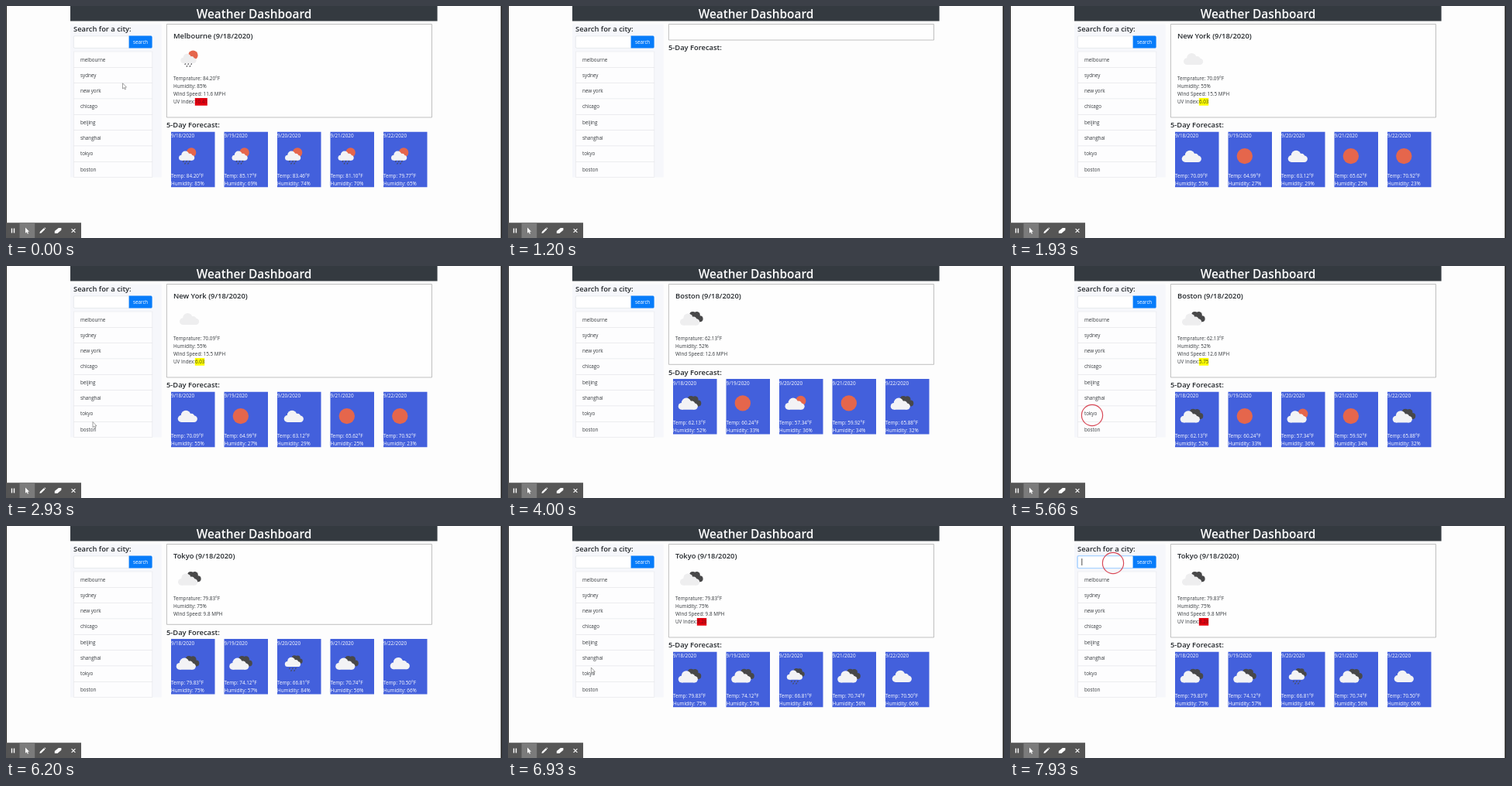
An HTML page that plays this animation: 640 px wide and 300 px high, repeating every 8000 ms.

```html
<!DOCTYPE html>
<html lang="en">
<head>
<meta charset="utf-8">
<title>Weather Dashboard</title>
<style>
html, body { margin: 0; width: 100%; height: 100%; overflow: hidden; background: #fdfdfd; }
svg { display: block; width: 100vw; height: 100vh; }
text { font: 6.35px "Open Sans", "Noto Sans", sans-serif; fill: #35393d; }
.head { font-size: 9.35px; font-weight: 600; fill: #24282c; }
.title { font-size: 15.4px; font-weight: 600; fill: #fff; text-anchor: middle; }
.item { font-size: 6.25px; }
.white { fill: #fff; }
</style>
</head>
<body>
<svg viewBox="0 0 640 300">
  <defs>
    <g id="cloud">
      <circle cx="-8.2" cy="3.1" r="4.4"/><circle cx="-2.2" cy="-1.5" r="6.2"/>
      <circle cx="4.8" cy=".6" r="4.3"/><circle cx="8.4" cy="3.3" r="4.2"/>
      <path d="M-8.2 0H5L8.4 7.5H-8.2z"/>
    </g>
    <g id="lobes">
      <circle cx="1.8" cy="-5.2" r="4.1"/><circle cx="7" cy="-5" r="4.2"/><circle cx="11" cy="0" r="4"/>
      <path d="M1 -5H8L11 4H4z"/>
    </g>
    <path id="drops" d="M-4.6 8.4l-.4 .8M-.6 8.4l-.4 .8M3.4 8.4l-.4 .8M-2.4 11.2l-.4 .8M1.6 11.2l-.4 .8" stroke="#4a4a4f" stroke-width="1.2" stroke-linecap="round"/>
    <path id="pointer" d="M0 0V7.2L1.7 5.7 2.9 8.2 4 7.7 2.9 5.3H5z"/>
  </defs>
  <path d="M0 0H640V300H0z" fill="#fdfdfd"/>
  <path d="M0 0H1V300H0zM638.4 0H640V300H638.4z" fill="#222"/>
  <path d="M83 0H556.6V19.6H83z" fill="#343a40"/>
  <text class="title" x="320" y="16.3">Weather Dashboard</text>
  <path d="M83 23.5H200.8V221.4H83z" fill="#f6f7fb"/>
  <text class="head" x="87" y="33.2">Search for a city:</text>
  <rect id="glow" x="86.2" y="37.7" width="73.4" height="17.6" rx="2.4" fill="#bfdeff"/>
  <rect id="input" x="87.3" y="38.8" width="72" height="15.6" rx="1.6" fill="#fff" stroke-width=".6"/>
  <path id="caret" d="M92.8 42V51" stroke="#222" stroke-width=".8"/>
  <path d="M158.6 38.6H187a1.6 1.6 0 0 1 1.6 1.6V53a1.6 1.6 0 0 1-1.6 1.6H158.6z" fill="#087cfa"/>
  <text class="white item" x="164" y="48.9">search</text>
  <g id="list"></g>
  <g id="main"></g>
  <g id="bar">
    <path d="M0 280.3H97V300H0z" fill="#555"/>
    <path d="M17.5 280.3H37.2V300H17.5z" fill="#7b7b7b"/>
    <path d="M6.8 287.6H8.2V293.4H6.8zM9.8 287.6H11.2V293.4H9.8z" fill="#fff"/>
    <use href="#pointer" x="25" y="286.5" fill="#fff"/>
    <path d="M43.4 294l.6-2.2 4.8-4.6 1.6 1.6-4.8 4.6zM49.4 286.7l.6-.5 1.5 1.5-.6.6z" fill="#fff"/>
    <path d="M62.8 291l5-4H71.4V289.8L66.4 294H62.8z" fill="#fff"/>
    <path d="M84.6 288.1l4.8 4.8M89.4 288.1l-4.8 4.8" stroke="#fff" stroke-width="1.1"/>
  </g>
  <use id="cursor" href="#pointer" fill="#fff" stroke="#666" stroke-width=".6"/>
  <path id="beam" d="M-1.5-4H1.5M0-4V4M-1.5 4H1.5" stroke="#333" stroke-width=".7"/>
  <circle id="ring" r="13.6" fill="none" stroke="#d84a58" stroke-width="1.2"/>
</svg>
<script>
const $ = id => document.getElementById(id);
const LOOP = 8000;

const cities = {
  Melbourne: { wind: '11.6', uv: '10.41', red: true, icon: 'shower',
    temps: ['84.20', '85.17', '83.46', '81.10', '79.77'], hums: [85, 69, 74, 70, 65],
    icons: ['shower', 'shower', 'shower', 'shower', 'shower'] },
  'New York': { wind: '15.5', uv: '6.03', icon: 'cloud',
    temps: ['70.09', '64.99', '63.12', '65.62', '70.92'], hums: [55, 27, 29, 25, 23],
    icons: ['cloud', 'sun', 'cloud', 'sun', 'sun'] },
  Boston: { wind: '12.6', uv: '5.75', icon: 'broken',
    temps: ['62.13', '60.24', '57.34', '59.92', '65.88'], hums: [52, 33, 36, 34, 32],
    icons: ['broken', 'sun', 'few', 'sun', 'broken'] },
  Tokyo: { wind: '9.8', uv: '8.28', red: true, icon: 'broken',
    temps: ['79.83', '74.12', '66.81', '70.74', '70.50'], hums: [75, 57, 84, 56, 66],
    icons: ['broken', 'broken', 'rain', 'broken', 'cloud'] }
};

// [start, city, whether the UV line has loaded]
const views = [
  [0, 'Melbourne', true], [1130, ''], [1530, 'New York', false], [1660, 'New York', true],
  [3530, ''], [4000, 'Boston', false], [4130, 'Boston', true],
  [5730, ''], [6130, 'Tokyo', false], [6260, 'Tokyo', true]
];

// [start, end, x, y]
const clicks = [[930, 1200, 112, 110], [3400, 3600, 110, 211], [5600, 5800, 106, 193], [7860, LOOP, 133, 48]];

// Each stroke of the pointer: [time, x, y] points
const moves = [
  [[0, 150.5, 99.8], [60, 150.5, 99.8], [600, 112, 110], [930, 112, 110]],
  [[2060, 112, 110], [2330, 113, 132], [2930, 112, 201.5], [3200, 110, 211], [3400, 110, 211]],
  [[4600, 110, 211], [4800, 105, 197], [5060, 105, 197], [5200, 106, 193], [5600, 106, 193]],
  [[6860, 106, 193], [7200, 118, 105], [7460, 133, 48], [7860, 133, 48]]
];

const text = (x, y, s, cls = '') => `<text class="${cls}" x="${x}" y="${y}">${s}</text>`;
const shape = (id, x, y, k, fill) => `<use href="#${id}" transform="translate(${x} ${y}) scale(${k})" fill="${fill}"/>`;
const sun = (x, y, r) => `<circle cx="${x}" cy="${y}" r="${r}" fill="#e5664c"/>`;

function icon(kind, x, y, light) {
  const dark = '#484849';
  const drops = '<use href="#drops" x="-.6" y="-2"/>';
  const parts = {
    sun: () => sun(0, 0, 10.2),
    cloud: () => shape('cloud', 0, .3, 1, light),
    few: () => sun(6.5, -3, 6.6) + shape('cloud', -1.2, .9, 1, light),
    broken: () => shape('lobes', 0, 0, 1, dark) + shape('cloud', -2, .9, 1, light),
    shower: () => sun(4.8, -4.6, 6.2) + shape('cloud', -1.2, -.4, .8, light) + drops,
    rain: () => shape('lobes', -.6, -2.6, .8, dark) + shape('cloud', -1.4, -1.4, .8, light) + drops
  };
  return `<g transform="translate(${x} ${y})">${parts[kind]()}</g>`;
}

function mainPanel(name, hasUv) {
  const c = cities[name];
  const bottom = !c ? 44 : hasUv ? 144 : 127.3;
  let out = `<path d="M207.4 23.5H549.5V${bottom}H207.4z" fill="#fefefe" stroke="#b0b0b0" stroke-width=".8"/>`
    + text(207, bottom + 13.4, '5-Day Forecast:', 'head');
  if (!c) return out;
  out += text(216, 41.8, `${name} (9/18/2020)`, 'head') + icon(c.icon, 236.6, 68.3, '#eeeeef')
    + text(216, 96.3, `Temprature: ${c.temps[0]}°F`)
    + text(216, 106.3, `Humidity: ${c.hums[0]}%`)
    + text(216, 116.3, `Wind Speed: ${c.wind} MPH`);
  if (hasUv) {
    const w = c.uv.length > 4 ? 16 : 12.4;
    out += text(216, 126.3, 'UV Index:')
      + `<path d="M243.8 119h${w}v9.8h-${w}z" fill="${c.red ? '#e3000f' : '#ffff00'}"/>`
      + `<text x="243.9" y="126.3" style="fill:${c.red ? '#7a0c12' : '#45451a'}">${c.uv}</text>`;
  }
  const top = bottom + 18.8;
  c.temps.forEach((temp, i) => {
    const x = 213 + i * 68.5;
    out += `<path d="M${x} ${top}h56.5v71.5h-56.5z" fill="#4360dc"/>`
      + text(x, top + 7.6, `9/${18 + i}/2020`, 'white')
      + icon(c.icons[i], x + 21.3, top + 31.3, '#f3f3f5')
      + text(x, top + 59.2, `Temp: ${temp}°F`, 'white')
      + text(x, top + 69.2, `Humidity: ${c.hums[i]}%`, 'white');
  });
  return out;
}

function pointerAt(t) {
  const path = moves.find(m => t >= m[0][0] && t < m[m.length - 1][0]);
  if (!path) return null;
  const i = path.findIndex(p => p[0] > t);
  const [a, b] = [path[i - 1], path[i]];
  const u = (t - a[0]) / (b[0] - a[0]);
  const e = u * u * (3 - 2 * u);
  return [a[1] + (b[1] - a[1]) * e, a[2] + (b[2] - a[2]) * e];
}

function place(id, pos) {
  $(id).style.display = pos ? '' : 'none';
  if (pos) $(id).setAttribute('transform', `translate(${pos[0]} ${pos[1]})`);
}

let shown = null;
function draw(t) {
  const view = views.filter(v => v[0] <= t).pop();
  if (view !== shown) {
    shown = view;
    $('main').innerHTML = mainPanel(view[1], view[2]);
  }
  const pos = pointerAt(t);
  const overInput = pos && pos[1] < 55;
  place('cursor', overInput ? null : pos);
  place('beam', overInput ? pos : null);
  const click = clicks.find(c => t >= c[0] && t < c[1]);
  place('ring', click && [click[2], click[3]]);
  const focus = t >= 7860;
  $('glow').style.display = $('caret').style.display = focus ? '' : 'none';
  $('input').setAttribute('stroke', focus ? '#80bdff' : '#d8dde3');
}

$('list').innerHTML = ['melbourne', 'sydney', 'new york', 'chicago', 'beijing', 'shanghai', 'tokyo', 'boston']
  .map((name, i) => {
    const y = 59 + i * 20.33;
    return `<rect x="87.3" y="${y}" width="101.5" height="20.33" fill="#fdfdfe" stroke="#e6e7ea" stroke-width=".6"/>`
      + text(96, y + 12.5, name, 'item');
  }).join('');

const start = performance.now();
function tick() {
  draw((performance.now() - start) % LOOP);
  requestAnimationFrame(tick);
}
tick();
</script>
</body>
</html>
```
